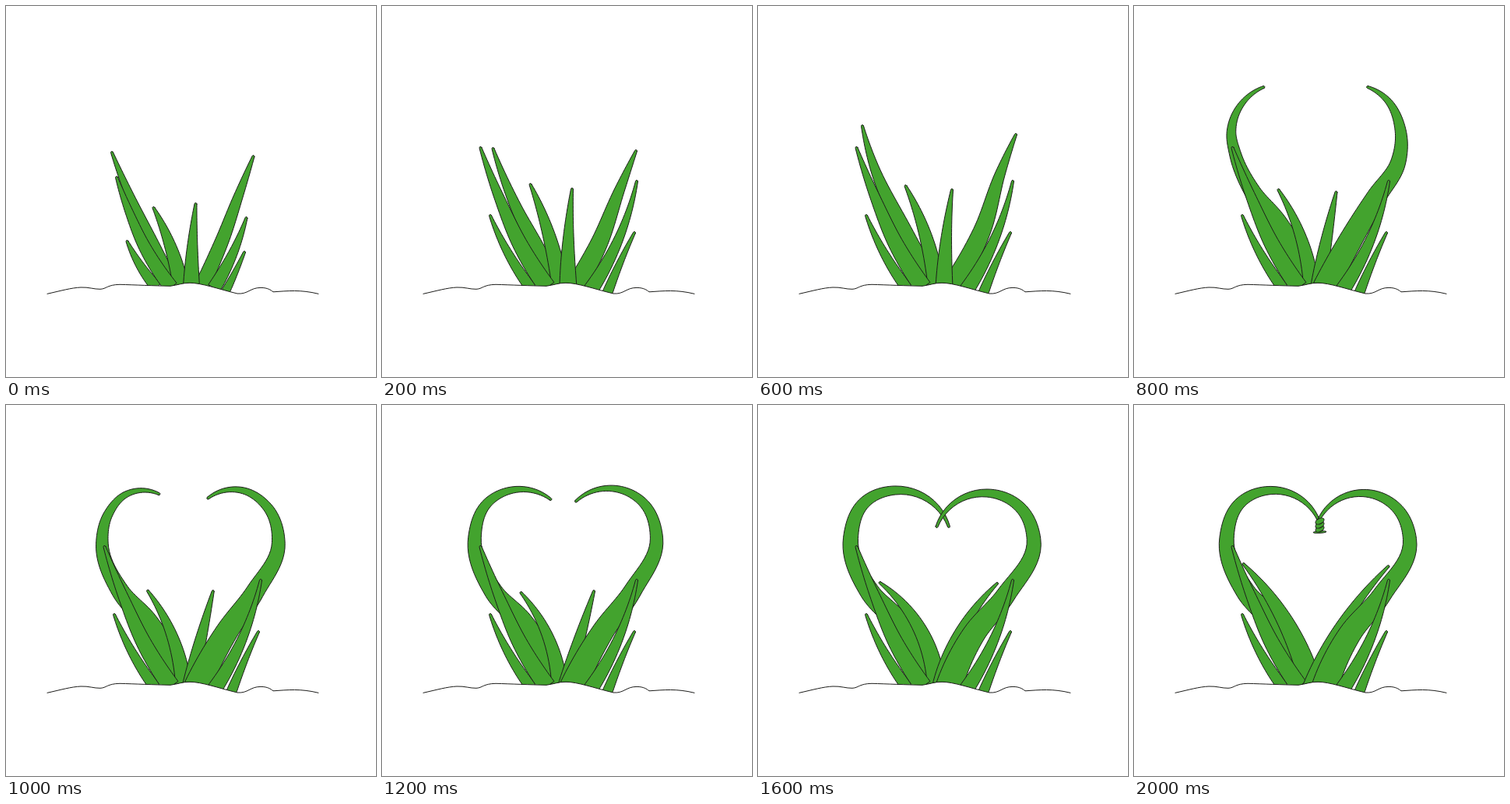
An HTML page that plays this animation: 475x476 px, repeating every 3400 ms.

```html
<!DOCTYPE html>
<html lang="en">
<head>
<meta charset="utf-8">
<title>Growing heart</title>
<style>
  html, body { margin: 0; width: 100%; height: 100%; overflow: hidden; background: #fff; }
  svg { display: block; width: 100vw; height: 100vh; }
  path, ellipse { fill: #43a32e; stroke: #1d1d1b; stroke-linejoin: round; stroke-linecap: round; }
  #ground { fill: none; }
</style>
</head>
<body>
<svg viewBox="0 0 475 476">
  <clipPath id="above"><path id="soil"/></clipPath>
  <g id="leaves" clip-path="url(#above)"></g>
  <g id="knot"></g>
  <path id="ground"/>
</svg>
<script>
const STEP = 200, LOOP = 3400, LAST = 10, TIP = 3, SAMPLES = 12;
const $ = id => document.getElementById(id);

const GROUND = 'M53,369.3C70,365.5 84,361.5 96,361C106,360.5 113,363.5 121,363.3' +
  'C129,363 130,357.6 146,357.3C165,357.8 190,359 211,359.3C221,358 226,355.3 236,355.3' +
  'C251,355.3 272,363 297,369C311,370 313,361.4 327,361.4C336,361.4 340,364.5 343,366.8' +
  'C362,365.6 378,363.6 401,369.3';

// Pose: width, taper, then the spine from tip to base.
const poses = {
  farLeft: [
    [11, 1.7, 155.5, 302, 171, 331, 193, 361],
    [11, 1.7, 139, 269, 163, 319, 191, 362]
  ],
  left: [
    [15, 1.8, 142, 220, 158, 264, 178, 309, 212, 361],
    [19, 1.7, 126.5, 182, 151, 247, 179, 309, 212, 361]
  ],
  midLeft: [
    [17, 1.7, 189.5, 259, 208, 300, 225, 362],
    [18, 1.8, 190.5, 229, 210, 280, 229, 362],
    [18, 1.8, 189.5, 231, 211, 282, 229, 362],
    [17, 1.5, 185.5, 236, 210, 285, 228, 362],
    [17, 1.5, 178.5, 241, 206, 282, 228, 362],
    [20, 1.7, 156.5, 228, 208, 288, 229, 362],
    [25, 1.7, 140.5, 204, 198, 285, 228, 362]
  ],
  center: [
    [18, 1.2, 243.5, 254, 239.5, 305, 238, 362],
    [19, 1.2, 244, 235, 239.5, 295, 239, 362],
    [19, 1.2, 249, 236, 242, 295, 239, 362],
    [16, 1.7, 259.5, 239, 249, 290, 236, 362],
    [16, 1.7, 272, 239, 256, 292, 235, 362],
    [16, 1.6, 307, 229, 259, 293, 233, 362],
    [16, 1.6, 326.5, 207, 269, 279, 226, 362]
  ],
  tallLeft: [
    [16, 1.8, 136, 188, 159, 244, 188, 306, 215, 362],
    [18, 1.8, 142.5, 183, 172, 258, 203, 319, 222, 362],
    [21, 1.8, 134, 154, 149, 206, 187, 288, 225, 362],
    [33, 1.05, 166.5, 104, 142, 121, 125, 161, 130, 190, 152, 238, 183, 278, 220, 362],
    [31, 1.2, 216.5, 121, 163, 110, 136, 125, 119, 170, 143, 239, 180, 279, 220, 362],
    [31, 1.2, 245, 156, 176, 109.5, 138, 124, 119, 171, 143, 239, 180, 279, 220, 362]
  ],
  tallRight: [
    [16, 2.2, 317.5, 193, 298, 245, 277, 302, 250, 362],
    [22, 1.8, 326, 186, 305, 236, 277, 308, 247, 362],
    [23, 1.9, 331, 165, 311, 215, 287, 290, 247, 362],
    [29, 1.7, 300, 104, 322, 117.5, 342, 159, 339, 201, 311, 245, 284, 290, 245, 362],
    [31, 1.1, 249, 123.5, 296, 107, 334, 124, 352.5, 171, 322, 238, 284, 290, 245, 362],
    [31, 1.1, 229.5, 156, 294, 113, 339, 134, 354, 172, 318, 244, 277, 294, 245, 362]
  ],
  farRight: [
    [8, 1.1, 306, 316, 296.5, 337, 281, 368],
    [10, 1.1, 324, 291, 308, 324, 289, 369]
  ],
  right: [
    [14, 1.4, 308.5, 272, 291, 318, 267, 362],
    [16, 1.1, 327, 225, 307.5, 290, 268, 364]
  ]
};

// Once tied, both tall leaves end inside the knot.
for (const name of ['tallLeft', 'tallRight']) {
  const [w, p, , , ...rest] = poses[name].at(-1);
  poses[name].push([w, p, 237, 148, ...rest]);
}

// Pose per step; a fraction blends two neighbours.
const outer = [0, 1], inner = [0, 1, 1, 2, 3, 3.5, 4, 4.5, 5, 6];
const track = {
  farLeft: outer, left: outer, farRight: outer, right: outer, midLeft: inner, center: inner,
  tallLeft: [0, 1, 2, 2, 3, 3.6, 4, 5, 5, 5, 6],
  tallRight: [0, 1, 2, 2, 3, 3.8, 4, 4.3, 5, 5, 6]
};

const mix = (a, b, f) => a.map((v, i) => v + (b[i] - v) * f);
const sub = (a, b) => [a[0] - b[0], a[1] - b[1]];
const dot = (a, b) => a[0] * b[0] + a[1] * b[1];
const unit = a => a.map(v => v / Math.hypot(...a));

function poseAt(name, step) {
  const t = track[name], at = t[Math.min(step, t.length - 1)], i = Math.floor(at);
  return at === i ? poses[name][i] : mix(poses[name][i], poses[name][i + 1], at - i);
}

// Samples a curve through the points that bends like circular arcs.
function spine(pts) {
  const legs = pts.slice(1).map((q, i) => sub(q, pts[i]));
  const dirs = legs.map(unit), size = legs.map(d => Math.hypot(...d));
  const tan = pts.map((p, i) => i && dirs[i] &&
    unit(mix(dirs[i - 1], dirs[i], size[i - 1] / (size[i - 1] + size[i]))));
  const mirror = (t, u) => u.map((v, i) => 2 * dot(t, u) * v - t[i]);
  const n = legs.length;
  tan[0] = mirror(tan[1], dirs[0]);
  tan[n] = mirror(tan[n - 1], dirs[n - 1]);

  const out = [pts[0]];
  legs.forEach((_, i) => {
    const reach = t => size[i] * 2 / 3 / (1 + dot(t, dirs[i]));
    const [a, d] = [pts[i], pts[i + 1]], [s, t] = [tan[i], tan[i + 1]];
    const b = a.map((v, k) => v + s[k] * reach(s)), c = d.map((v, k) => v - t[k] * reach(t));
    for (let k = 1; k <= SAMPLES; k++) {
      const f = k / SAMPLES, g = 1 - f;
      out.push(a.map((v, m) =>
        g * g * g * v + 3 * g * g * f * b[m] + 3 * g * f * f * c[m] + f * f * f * d[m]));
    }
  });
  return out;
}

function leaf([width, taper, ...flat]) {
  const pts = [];
  for (let i = 0; i < flat.length; i += 2) pts.push([flat[i], flat[i + 1]]);
  const line = spine(pts), run = [0];
  for (let i = 1; i < line.length; i++) run.push(run[i - 1] + Math.hypot(...sub(line[i], line[i - 1])));
  const edge = side => line.map((p, i) => {
    const [dx, dy] = unit(sub(line[i + 1] || p, line[i - 1] || p));
    const h = side / 2 * (TIP + width * (1 - (1 - run[i] / run.at(-1)) ** taper));
    return [p[0] + dy * h, p[1] - dx * h].map(v => v.toFixed(2)).join();
  });
  const r = edge(1), l = edge(-1).reverse(), cap = TIP / 2;
  return `<path d="M${r.join('L')}L${l.join('L')}A${cap} ${cap} 0 0 1 ${r[0]}Z"/>`;
}

const coil = (y, rx, ry, tilt) =>
  `<ellipse rx="${rx}" ry="${ry}" transform="translate(238.5 ${y}) rotate(${tilt})"/>`;

function knot(step) {
  const turns = step - 8;
  if (turns < 1) return '';
  let out = turns > 1 ? coil(163, 8.3, 1.2, -4) : '';
  for (let i = turns > 1 ? 2 : 0; i >= 0; i--) out += coil(149 + 5 * i, 6, 3.4, -28);
  return out;
}

function draw(step) {
  // The right leaf moves in front of the centre one when it starts to curl.
  const pair = step < 4 ? ['tallRight', 'center'] : ['center', 'tallRight'];
  const order = ['farLeft', 'tallLeft', 'midLeft', 'left', ...pair, 'farRight', 'right'];
  $('leaves').innerHTML = order.map(name => leaf(poseAt(name, step))).join('');
  $('knot').innerHTML = knot(step);
}

$('ground').setAttribute('d', GROUND);
$('soil').setAttribute('d', GROUND + 'V0H53Z');

let shown = -1;
const start = performance.now();
function tick() {
  const step = Math.min(LAST, Math.floor((performance.now() - start) % LOOP / STEP));
  if (step !== shown) draw(shown = step);
  requestAnimationFrame(tick);
}
tick();
</script>
</body>
</html>
```
